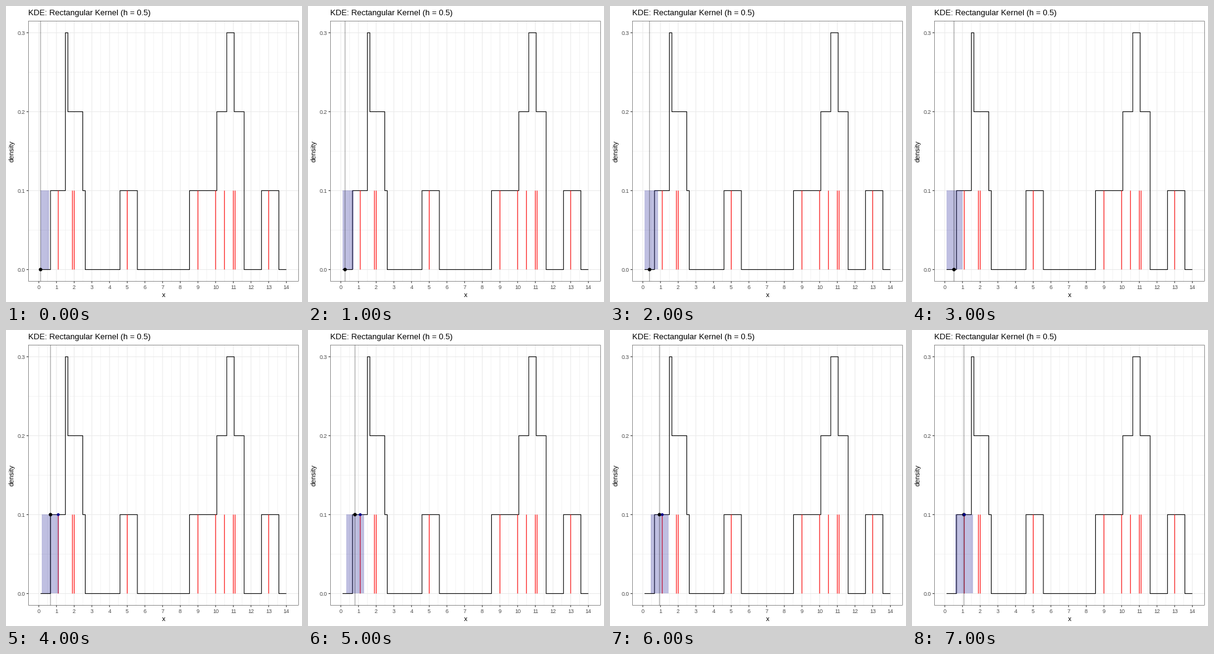
A matplotlib script for the animation above (8 s loop, 480 by 480 pixels).

```python
import numpy as np
import matplotlib.pyplot as plt
from matplotlib.animation import FuncAnimation
from matplotlib.patches import Circle, Rectangle

plt.rcParams["path.snap"] = False
plt.rcParams["font.family"] = "Liberation Sans"

SIZE = 480
LEFT, RIGHT, TOP, BOTTOM = 36.13, 474.52, 24.2, 446.6
LINE = 1.07
GRID, TICK, LABEL = "#ebebeb", "#333333", "#4d4d4d"

H = 0.5
DATA = np.array([1.1, 1.9, 2, 5, 9, 10, 10.5, 11, 11.1, 13])
XS = np.linspace(0.1, 14, 100)
HEIGHT = 1 / len(DATA)
FRAMES = 8


def px(x):
    """Data x to stage pixels; the range is padded by 5% on both sides."""
    span = XS[-1] - XS[0]
    return LEFT + (x - XS[0] + 0.05 * span) / (1.1 * span) * (RIGHT - LEFT)


def py(y):
    return BOTTOM - (y + 0.015) / 0.33 * (BOTTOM - TOP)


def inside(x):
    return np.abs(DATA - x) <= H


def density(x):
    return inside(x).sum() * HEIGHT


fig = plt.figure(figsize=(SIZE / 72, SIZE / 72), dpi=72, facecolor="white")
ax = fig.add_axes([0, 0, 1, 1])
ax.set_xlim(0, SIZE)
ax.set_ylim(SIZE, 0)
ax.axis("off")


def line(xs, ys, color, width=LINE, z=1, **kw):
    return ax.plot(xs, ys, color=color, lw=width, zorder=z,
                   solid_capstyle="butt", **kw)[0]


def label(x, y, text, size, color="black", ha="center", **kw):
    ax.text(x, y, text, fontsize=size, color=color, ha=ha,
            va="baseline", **kw)


def dot(radius, color, z):
    return ax.add_patch(Circle((0, 0), radius, fc=color, ec="none", zorder=z))


# Grid, minor lines first
for x in np.arange(0.5, 14):
    line([px(x)] * 2, [TOP, BOTTOM], GRID, LINE / 2)
for y in (0.05, 0.15, 0.25):
    line([LEFT, RIGHT], [py(y)] * 2, GRID, LINE / 2)

# Major grid, ticks and their labels
for y in (0, 0.1, 0.2, 0.3):
    line([LEFT, RIGHT], [py(y)] * 2, GRID, z=2)
    line([LEFT - 2.74, LEFT], [py(y)] * 2, TICK, z=2)
    label(31.6, py(y) + 3.3, f"{y:.1f}", 9, LABEL, "right")
for x in range(15):
    line([px(x)] * 2, [TOP, BOTTOM], GRID, z=2)
    line([px(x)] * 2, [BOTTOM, BOTTOM + 2.74], TICK, z=2)
    label(px(x), 459.3, str(x), 9, LABEL)

# Titles
label(36, 15, "KDE: Rectangular Kernel (h = 0.5)", 13, ha="left")
label((LEFT + RIGHT) / 2, 472, "x", 11)
label(13, (TOP + BOTTOM) / 2, "density", 11, rotation=90,
      rotation_mode="anchor")

# Density curve and observations
line(px(XS), [py(density(x)) for x in XS], "black", z=3,
     drawstyle="steps-post", solid_joinstyle="round")
for d in DATA:
    line([px(d)] * 2, [py(0), py(HEIGHT)], "red", z=4)

# Panel border, its inner half only
edge = LINE / 4
ax.add_patch(Rectangle((LEFT + edge, TOP + edge), RIGHT - LEFT - 2 * edge,
                       BOTTOM - TOP - 2 * edge, fill=False, ec=TICK,
                       lw=LINE / 2, zorder=9))

# Moving parts
window = ax.add_patch(Rectangle((0, round(py(HEIGHT))), 0,
                                round(py(0)) - round(py(HEIGHT)),
                                fc="darkblue", ec="none", alpha=0.25,
                                antialiased=False, zorder=5))
cursor = line([0, 0], [TOP, BOTTOM], "black", z=6, alpha=0.4)
marker = dot(2.84, "black", 7)
hits = [dot(2.3, "darkblue", 8) for _ in DATA]


def update(i):
    x = XS[i]
    start, end = round(px(max(x - H, XS[0]))), round(px(x + H))
    window.set_x(start)
    window.set_width(end - start)
    cursor.set_xdata([px(x)] * 2)
    marker.center = px(x), py(density(x))
    for hit, d, on in zip(hits, DATA, inside(x)):
        hit.center = px(d), py(HEIGHT)
        hit.set_visible(bool(on))
    return [window, cursor, marker, *hits]


anim = FuncAnimation(fig, update, frames=FRAMES, interval=1000, repeat=True,
                     repeat_delay=0)
plt.show()
```
